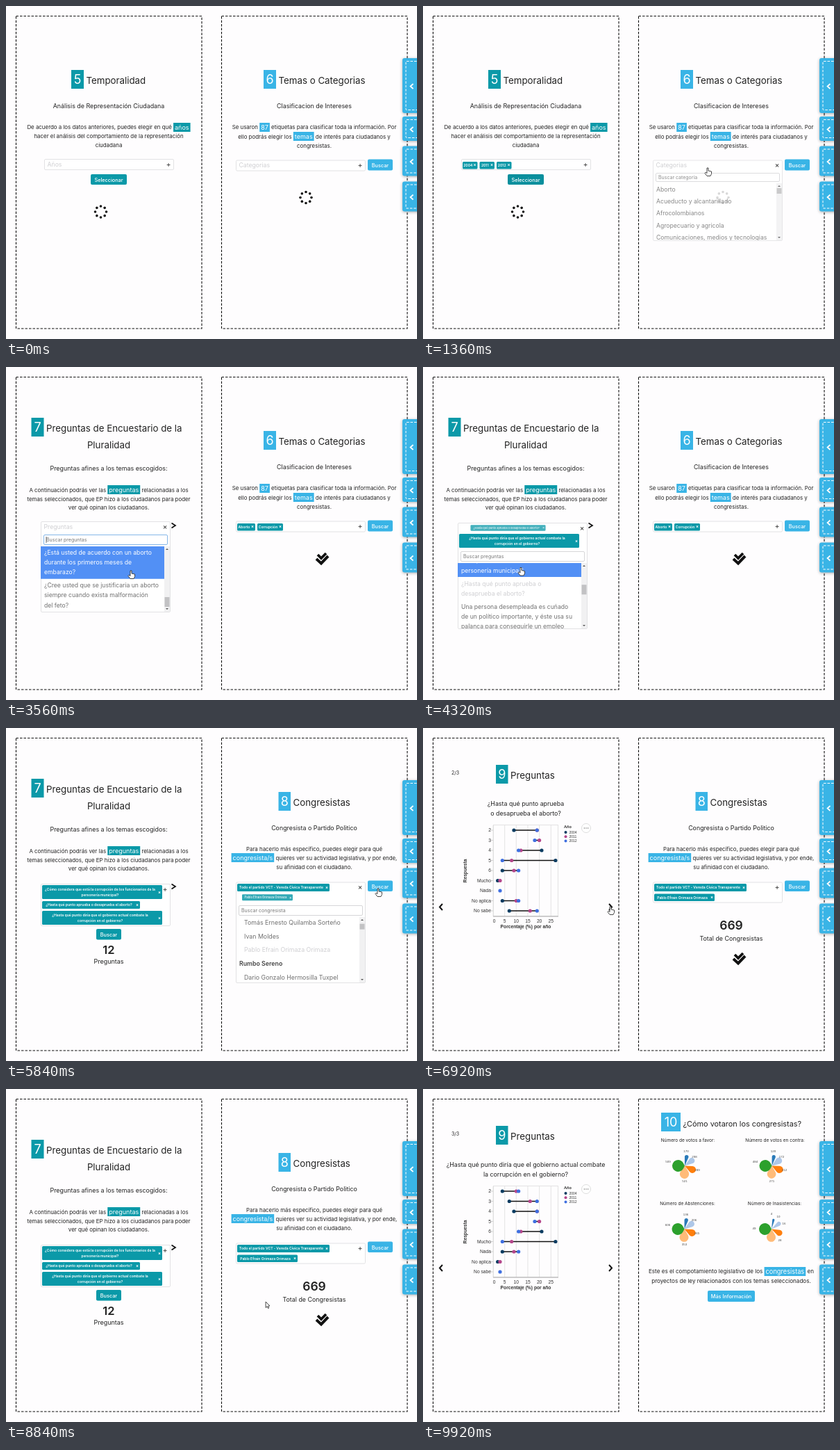
Write an HTML page with a canvas that moves like this. It is 592 px wide and 479 px high and loops after 9.96 s.

```html
<!DOCTYPE html>
<html lang="es">
<head>
<meta charset="utf-8">
<style>
html, body { margin: 0; width: 100%; height: 100%; overflow: hidden; background: #fefdfe; }
canvas { display: block; }
</style>
</head>
<body>
<canvas id="stage" width="592" height="479"></canvas>
<script>
const ctx = document.getElementById('stage').getContext('2d');
const LOOP = 9960, STEP = 40;
const PAPER = '#fefdfe', TEAL = '#0b99a8', BLUE = '#39b4e6';
const INK = '#222', GREY = '#707070', PALE = '#cfcfd2', PICK = '#5290f5';
const SANS = 'Inter, sans-serif', ARIAL = '"Liberation Sans", sans-serif';

const clamp = v => Math.max(0, Math.min(1, v));
const smooth = v => v * v * (3 - 2 * v);
const between = (t, a, b) => t >= a && t < b;

// Piecewise eased value through [time, value...] keys.
function track(t, keys) {
  if (t <= keys[0][0]) return keys[0].slice(1);
  for (let i = 1; i < keys.length; i++) {
    const [a, b] = [keys[i - 1], keys[i]];
    if (t <= b[0]) {
      const p = smooth((t - a[0]) / (b[0] - a[0]));
      return a.slice(1).map((v, k) => v + (b[k + 1] - v) * p);
    }
  }
  return keys[keys.length - 1].slice(1);
}

function text(s, x, y, size, { color = INK, align = 'left', weight = 400, family = SANS } = {}) {
  ctx.font = `${weight} ${size}px ${family}`;
  ctx.textAlign = align;
  ctx.fillStyle = color;
  ctx.fillText(s, x, y + size * 0.36);
}
const centered = (s, x, y, size, opts) => text(s, x, y, size, { align: 'center', ...opts });

function box(x, y, w, h, fill, stroke, r = 1.5) {
  ctx.beginPath();
  ctx.roundRect(x, y, w, h, r);
  if (fill) { ctx.fillStyle = fill; ctx.fill(); }
  if (stroke) { ctx.strokeStyle = stroke; ctx.lineWidth = 1; ctx.stroke(); }
}

function disc(x, y, r, color) {
  ctx.beginPath();
  ctx.arc(x, y, r, 0, 7);
  ctx.fillStyle = color;
  ctx.fill();
}

function line(points, color, width) {
  ctx.beginPath();
  points.forEach(([x, y]) => ctx.lineTo(x, y));
  ctx.strokeStyle = color;
  ctx.lineWidth = width;
  ctx.stroke();
}

// Centered line; parts wrapped in [ ] become highlighted words.
function rich(s, cx, y, color, size = 7.9) {
  const big = size * 1.14;
  const parts = s.split(/(\[.*?\])/).filter(Boolean).map(p => {
    const mark = p[0] === '[', str = mark ? p.slice(1, -1) : p;
    ctx.font = `400 ${mark ? big : size}px ${SANS}`;
    return { mark, str, w: ctx.measureText(str).width + (mark ? 4 : 0) };
  });
  let x = cx - parts.reduce((sum, p) => sum + p.w, 0) / 2;
  for (const p of parts) {
    if (p.mark) {
      box(x, Math.round(y - 7), p.w, 13, color, null, 0);
      text(p.str, x + 2, y, big, { color: '#fff' });
    } else text(p.str, x, y, size);
    x += p.w;
  }
}

function heading(n, x, y, w, color, title, size = 13.3) {
  box(x, y, w, 27, color, null, 0);
  centered(n, x + w / 2, y + 13.5, 18, { color: '#fff' });
  text(title, x + w + 3.5, y + 15.6, size);
}

function button(s, x, y, w, h, color) {
  box(x, y, w, h, color, null, 2);
  centered(s, x + w / 2, y + h / 2 + 0.7, 7.3, { color: '#fff', weight: 500 });
}

function chip(lines, x, y, w, h, grow = 1) {
  const s = 0.5 + grow / 2;
  ctx.save();
  ctx.globalAlpha = s;
  ctx.translate(x + w / 2, y + h / 2);
  ctx.scale(s, s);
  box(-w / 2, -h / 2, w, h, TEAL);
  lines.forEach((l, i) =>
    centered(l, -3, (i - (lines.length - 1) / 2) * 8.2, 5.05, { color: '#fff', weight: 600 }));
  centered('×', w / 2 - 4, lines.length > 1 ? 1 : 0, 6, { color: '#fff', weight: 700 });
  ctx.restore();
}

function spinner(x, y) {
  for (let i = 0; i < 8; i++) {
    const a = i * Math.PI / 4;
    disc(x + 8 * Math.cos(a), y + 8 * Math.sin(a), 1.8, '#111');
  }
}

function doubleCheck(x, y) {
  line([[x - 6, y - 5], [x - 1, y], [x + 6, y - 7]], '#111', 3.8);
  line([[x - 8, y + 1], [x - 1, y + 7.5], [x + 9, y - 3]], '#111', 4);
}

const rowHeight = (list, row) => row.lines.length * list.pitch + list.pad;
const listHeight = list => list.rows.reduce((h, r) => h + rowHeight(list, r), 0);

function drawList(list, x, y, w, h, scroll, hot, picked) {
  ctx.save();
  ctx.beginPath();
  ctx.rect(x, y, w, h);
  ctx.clip();
  let top = y - scroll;
  list.rows.forEach((row, i) => {
    const height = rowHeight(list, row);
    const active = i === hot && !picked.includes(i);
    if (active) box(x, top, w - 8, height, PICK, null, 0);
    const color = active ? '#fff' : picked.includes(i) ? PALE : row.group ? '#444' : GREY;
    row.lines.forEach((l, k) => text(l, x + 5 + (row.indent || 0),
      top + list.pad / 2 + (k + 0.5) * list.pitch, list.size, { color, weight: row.group ? 600 : 400 }));
    top += height;
  });
  box(x + w - 8, y, 8, h, '#f1f1f2', null, 0);
  const p = clamp(scroll / Math.max(1, listHeight(list) - h));
  box(x + w - 7.5, y + 7 + p * (h - 28), 7, list.thumb, '#c2c2c4', null, 0);
  for (const [cy, d] of [[y + 4, -1], [y + h - 4, 1]]) {
    ctx.beginPath();
    ctx.moveTo(x + w - 6, cy - d);
    ctx.lineTo(x + w - 2, cy - d);
    ctx.lineTo(x + w - 4, cy + d);
    ctx.fillStyle = '#555';
    ctx.fill();
  }
  ctx.restore();
}

function picker({ x, y, w = 186, h = 15, open, hint, search, end, list, gap = 19, view = 94, scroll = 0, hot, picked = [], focus, fade = 1 }) {
  if (!open) {
    box(x + 0.5, y + 0.5, w, h, '#fff', '#e2e2e4');
  } else {
    ctx.globalAlpha = fade;
    box(x + 0.5, y + 0.5, w, end + gap + view - y, '#fff', '#e2e2e4');
    box(x + 4.5, end + 2.5, w - 8, gap === 17 ? 12 : 14, '#fff', focus ? '#86b7e8' : '#d6d6d8');
    text(search, x + 8, end + (gap === 17 ? 8.5 : 9.5), 7, { color: '#777' });
    if (focus) line([[x + 8, end + 5], [x + 8, end + 14]], '#333', 0.7);
    drawList(list, x, end + gap, w, view, scroll, hot, picked);
    ctx.globalAlpha = 1;
  }
  if (hint) text(hint, x + 4.5, y + 7.5, 8.7, { color: PALE });
  centered(open ? '×' : '+', x + w - 7, y + 7, 10, { color: '#444', weight: 500 });
}

const single = (s, extra) => ({ lines: [s], ...extra });
const years = {
  rows: [2004, 2005, 2006, 2008, 2009, 2010, 2011, 2012, 2013].map(n => single(String(n))),
  pitch: 17.3, pad: 0, size: 8.65, thumb: 14
};
const topics = {
  rows: ['Aborto', 'Acueducto y alcantarillado', 'Afrocolombianos', 'Agropecuario y agricola',
    'Comunicaciones, medios y tecnologias', 'Conflicto armado', 'Corrupción', 'Cultura', 'Defensa',
    'Deporte', 'Educación', 'Empleo', 'Energía', 'Salud', 'Turismo', 'Vivienda'].map(s => single(s)),
  pitch: 17.3, pad: 0, size: 8.65, thumb: 8
};
const GOV = ['¿Hasta qué punto diría que el gobierno actual combate la', 'corrupción en el gobierno?'];
const OFFICE = ['¿Cómo considera que está la corrupción de los funcionarios de la', 'personería municipal?'];
const ABORTION = ['¿Hasta qué punto aprueba o desaprueba el aborto?'];
const questions = {
  rows: [
    '¿Qué tanto confía usted/en los partidos políticos?',
    '¿Cree que el voto cambia/la forma como se gobierna/en el país?',
    '¿Está satisfecho con la/democracia actual?',
    '¿Cómo considera que está la/corrupción de los funcionarios de la/personería municipal?',
    '¿Hasta qué punto aprueba o/desaprueba el aborto?',
    'Una persona desempleada es cuñado/de un político importante, y éste usa su/palanca para conseguirle un empleo/público. ¿Qué opina usted?',
    '¿Hasta qué punto diría que el/gobierno actual combate la/corrupción en el gobierno?',
    '¿Qué tan común es la/corrupción en el país?',
    '¿Ha tenido que pagar un/soborno durante el/último año?',
    '¿Está usted de acuerdo con un aborto/durante los primeros meses de/embarazo?',
    '¿Cree usted que se justificaria un aborto/siempre cuando exista malformación/del feto?'
  ].map(s => ({ lines: s.split('/') })),
  pitch: 14.1, pad: 5, size: 8.65, thumb: 14
};
const PARTY = 'Todo el partido VCT - Vereda Cívica Transparente';
const MEMBER = 'Pablo Efrain Orimaza Orimaza';
const members = {
  rows: [single(PARTY, { group: true }),
    ...['Tomás Ernesto Quilamba Sorteño', 'Ivan Moldes', MEMBER].map(s => single(s, { indent: 7 })),
    single('Rumbo Sereno', { group: true }),
    ...['Dario Gonzalo Hermosilla Tuxpel', 'Elena Marquina Sotelor', 'Nestor Pardales'].map(s => single(s, { indent: 7 })),
    ...Array.from({ length: 24 }, (_, i) => single('Congresista ' + (i + 1), { indent: 7 }))],
  pitch: 19.6, pad: 0, size: 8.8, thumb: 8
};

function panelYears(t) {
  heading('5', 94, 92, 18, TEAL, 'Temporalidad');
  centered('Análisis de Representación Ciudadana', 148, 143.5, 8.9);
  rich('De acuerdo a los datos anteriores, puedes elegir en qué [años]', 148, 174.5, TEAL);
  rich('hacer el análisis del comportamiento de la representación', 148, 187.5, TEAL);
  rich('ciudadana', 148, 200.5, TEAL);
  button('Seleccionar', 122, 242, 52, 15, between(t, 1000, 1400) ? '#0a8f9d' : TEAL);
  spinner(136.5, 296);
  const picks = [[400, 0], [620, 6], [780, 7]].filter(p => t >= p[0]);
  picker({
    x: 55, y: 220, open: between(t, 160, 900), hint: picks.length ? '' : 'Años',
    search: 'Buscar año', end: 236, gap: 17, view: 82, list: years,
    scroll: track(t, [[430, 0], [560, 73]])[0], hot: t < 500 ? 0 : t < 640 ? 6 : 7,
    picked: picks.map(p => p[1])
  });
  picks.forEach(([, i], k) => chip(years.rows[i].lines, 57 + k * 24.5, 224, 21.5, 10.5));
}

function panelTopics(t) {
  heading('6', 371, 92, 18, BLUE, 'Temas o Categorias');
  centered('Clasificacion de Intereses', 444, 143.5, 8.9);
  rich('Se usaron [87] etiquetas para clasificar toda la información. Por', 444, 174.5, BLUE);
  rich('ello podrás elegir los [temas] de interés para ciudadanos y', 444, 188, BLUE);
  rich('congresistas.', 444, 201.5, BLUE);
  button('Buscar', 521, 220.5, 36, 16, BLUE);
  if (t < 2200) spinner(432, 275.5); else doubleCheck(455, 275);
  const picks = [[1560, 0], [1880, 6]].filter(p => t >= p[0]);
  picker({
    x: 331, y: 221.5, open: between(t, 1300, 2000), fade: clamp((t - 1300) / 72),
    hint: picks.length ? '' : 'Categorias', search: 'Buscar categoría', end: 238, gap: 17, view: 82,
    list: topics, scroll: track(t, [[1600, 0], [1800, 70]])[0],
    hot: between(t, 1480, 1600) ? 0 : t > 1780 ? 6 : -1, picked: picks.map(p => p[1])
  });
  if (picks.length) chip(['Aborto'], 333, 225, 26, 10.5);
  if (picks.length > 1) chip(['Corrupción'], 362, 225, 37, 10.5);
}

function panelQuestions(t) {
  heading('7', 36.5, 73, 18, TEAL, 'Preguntas de Encuestario de la');
  centered('Pluralidad', 148, 112, 13.3);
  centered('Preguntas afines a los temas escogidos:', 148, 146, 8.9);
  rich('A continuación podrás ver las [preguntas] relacionadas a los', 148, 177, TEAL);
  rich('temas seleccionados, que EP hizo a los ciudadanos para poder', 148, 190, TEAL);
  rich('ver qué opinan los ciudadanos.', 148, 202.5, TEAL);
  line([[238.5, 224.5], [244, 228], [238.5, 231.5]], '#111', 1.7);

  const chosen = [[4400, OFFICE, 3, 173], [4240, ABORTION, 4, 141], [4060, GOV, 6, 173]].filter(c => t >= c[0]);
  const heights = chosen.map(c => c[1].length > 1 ? 20 : 11);
  const end = chosen.length ? 226 + heights.reduce((s, h) => s + h + 3, 0) : 239;
  picker({
    x: 50, y: chosen.length ? 224 : 222, h: chosen.length ? end - 226 : 15,
    open: between(t, 2900, 4480), focus: !chosen.length,
    hint: chosen.length ? '' : 'Preguntas', search: 'Buscar preguntas', end, list: questions,
    scroll: track(t, [[3080, 0], [3440, 384], [3640, 384], [3920, 224], [4080, 224], [4260, 141]])[0],
    hot: t < 3300 ? 1 : t < 3760 ? 9 : t < 4100 ? 6 : t < 4280 ? 4 : 3,
    picked: chosen.map(c => c[2])
  });
  let y = 226;
  chosen.forEach(([at, lines, , w], i) => {
    chip(lines, 52, y, w, heights[i], clamp((t - at) / 150));
    y += heights[i] + 3;
  });
  if (t >= 4480) button('Buscar', 130, 289, 36, 15.5, TEAL);
  if (t >= 4600) {
    centered(String(Math.round(12 * clamp((t - 4600) / 160))), 148, 319, 16.5, { weight: 600 });
    centered('Preguntas', 148, 336, 9);
  }
}

function panelMembers(t) {
  heading('8', 392.5, 92, 17.5, BLUE, 'Congresistas');
  centered('Congresista o Partido Politico', 444, 143.5, 8.9);
  rich('Para hacerlo más específico, puedes elegir para qué', 444, 174, BLUE);
  rich('[congresista/s] quieres ver su actividad legislativa, y por ende,', 444, 187, BLUE);
  rich('su afinidad con el ciudadano.', 444, 200.5, BLUE);
  button('Buscar', 521, 219.5, 36, 15.5, BLUE);
  const party = t >= 5360, member = t >= 5740;
  picker({
    x: 331, y: 221.5, h: member ? 29 : 15, open: between(t, 5040, 5900),
    hint: party ? '' : 'Congresistas', search: 'Buscar congresista',
    end: member ? 253 : party ? 239 : 237, list: members,
    scroll: track(t, [[5420, 0], [5620, 21.4]])[0],
    hot: between(t, 5180, 5420) ? 0 : between(t, 5620, 5760) ? 3 : -1,
    picked: [...(party ? [0] : []), ...(member ? [3] : [])]
  });
  if (party) chip([PARTY], 333, 224, 133, 11);
  if (member) chip([MEMBER], 333, 238.5, 87, 10.5, clamp((t - 5740) / 148));
  if (t >= 6040) {
    centered(String(Math.round(669 * smooth(clamp((t - 6040) / 360)))), 444, 284, 17.5, { weight: 600 });
    centered('Total de Congresistas', 444, 303, 8.9);
    doubleCheck(455, 331);
  }
}

const YEAR_COLORS = ['#0b3c61', '#b5478c', '#3f6fe0'];
// Each answer: values for 2004, 2011 and 2012.
const ANSWERS = [
  ['2', 4, 10, 11], ['3', 7, 16, 19], ['4', 9, 19, 19], ['5', null, 20, 18], ['6', 21, 12, 11],
  ['Mucho', 27, 8, 4], ['Nada', 4, 9, 11], ['No aplica', 2, 3, null], ['No sabe', null, null, 3]
];

function panelAnswers(t) {
  const page = t < 6600 ? 3 : t < 6840 ? 1 : t < 7080 ? 2 : 3;
  const arial = (s, x, y, size, opts) => text(s, x, y, size, { family: ARIAL, color: '#333', ...opts });
  heading('9', 105, 53, 17.5, TEAL, 'Preguntas');
  text(page + '/3', 41, 64, 7);
  const title = [
    ['¿Cómo considera que está la corrupción de los', 'funcionarios de la personería municipal?'],
    ['¿Hasta qué punto aprueba', 'o desaprueba el aborto?'],
    ['¿Hasta qué punto diría que el gobierno actual combate', 'la corrupción en el gobierno?']
  ][page - 1];
  title.forEach((l, i) => centered(l, 148, 109 + i * 14.3, 8.85));

  const px = v => 101 + v * 3.33;
  for (let v = 0; v <= 25; v += 5) {
    line([[px(v), 140], [px(v), 271]], '#ddd', 0.8);
    arial(String(v), px(v) + (v ? 0 : 1.5), 278, 6.7, { align: 'center' });
  }
  ctx.strokeStyle = '#ddd';
  ctx.strokeRect(101.5, 139.5, 93, 131);
  line([[101, 271], [195, 271]], '#999', 0.8);
  ANSWERS.forEach(([label], i) => {
    const y = 147 + i * 14.5;
    const values = ANSWERS[(i + (3 - page) * 2) % ANSWERS.length].slice(1);
    const shown = values.filter(v => v !== null);
    arial(label, 98, y, 6.7, { align: 'right' });
    line([[97, y], [101, y]], '#aaa', 0.5);
    line([[px(Math.min(...shown)), y], [px(Math.max(...shown)), y]], '#111', 1.5);
    values.forEach((v, k) => v !== null && disc(px(v), y, 2.6, YEAR_COLORS[k]));
  });
  arial('Porcentaje (%) por año', 148, 286, 6.7, { align: 'center', weight: 700 });
  ctx.save();
  ctx.translate(60.5, 205.5);
  ctx.rotate(-Math.PI / 2);
  arial('Respuesta', 0, 0, 6.7, { align: 'center', weight: 700 });
  ctx.restore();
  arial('Año', 203, 142, 5.6, { weight: 700 });
  ['2004', '2011', '2012'].forEach((s, i) => {
    disc(205.5, 150 + i * 6.2, 2, YEAR_COLORS[i]);
    arial(s, 210.5, 150 + i * 6.2, 5);
  });
  box(228.5, 137.5, 13, 13, '#fff', '#ddd', 6.5);
  [-2.6, 0, 2.6].forEach(d => disc(235 + d, 144, 0.75, '#777'));
  line([[28, 253], [24, 257.5], [28, 262]], '#111', 2);
  line([[268, 253], [272, 257.5], [268, 262]], '#111', 2);
}

const PETAL_COLORS = ['#2a7ab9', '#aec7e8', '#ff7f0e', '#ffbb78', '#2ca02c'];
function votes(title, cx, cy, labels, sizes, spots) {
  centered(title, cx + 4.5, cy - 36.5, 6.5);
  const angles = [-78, -36, 26, 92, 180];
  sizes.forEach((r, i) => {
    const a = angles[i] * Math.PI / 180, d = i === 4 ? r + 1 : 14 - r / 3;
    const spread = Math.acos(Math.min(0.95, r / d));
    ctx.beginPath();
    ctx.moveTo(cx, cy);
    ctx.arc(cx + d * Math.cos(a), cy + d * Math.sin(a), r, a + Math.PI + spread, a + Math.PI - spread);
    ctx.fillStyle = PETAL_COLORS[i];
    ctx.fill();
  });
  labels.forEach((n, i) => centered(String(n), cx + spots[i][0], cy + spots[i][1], 4.4, { color: '#444', family: ARIAL }));
}

function panelVotes() {
  heading('10', 343, 34, 28, BLUE, '¿Cómo votaron los congresistas?', 10.9);
  const spots = [[2, -21], [14, -13], [18, 6], [0, 22], [-24, -6]];
  votes('Número de votos a favor:', 377, 110.5, [170, 298, 289, 521, 509], [2.8, 4.2, 5, 6.6, 8.5], spots);
  votes('Número de votos en contra:', 502.5, 110.5, [120, 172, 212, 271, 484], [2.6, 4.6, 5.2, 6.3, 8.5], spots);
  votes('Número de Abstenciones:', 376.5, 201.5, [136, 206, 265, 353, 606], [2.7, 4.3, 5, 6.5, 8.5], spots);
  votes('Número de Inasistencias:', 502, 201.5, [4, 10, 16, 28, 49], [1.6, 3, 4.3, 6.5, 8.5],
    [[0, -22], [10, -18], [18, -8], [12, 16], [-25, -1]]);
  rich('Este es el compotamiento legislativo de los [congresistas] en', 444, 262.5, BLUE, 8.1);
  rich('proyectos de ley relacionados con los temas seleccionados.', 444, 276, BLUE, 8.1);
  button('Más Información', 410, 290, 68, 16, BLUE);
}

function panel(draw, t, left, offset = 0) {
  const x = left ? 0 : 296;
  ctx.save();
  ctx.translate(0, Math.round(offset));
  ctx.fillStyle = PAPER;
  ctx.fillRect(x, 0, 296, 480);
  ctx.setLineDash([3.5, 2]);
  ctx.strokeStyle = '#111';
  ctx.lineWidth = 1.1;
  ctx.strokeRect(x + 14.5, 14.5, 267.5, 449.5);
  ctx.setLineDash([]);
  draw(t);
  ctx.restore();
}

const slideIn = (t, start) => 480 * (1 - clamp((t - start) / 200) ** 2);
const slideOut = (t, start) => 480 * clamp((t - start) / 200) ** 2;

function tabs() {
  for (const [y, h] of [[75, 79], [159, 35], [201.5, 43], [252.5, 43]]) {
    ctx.save();
    ctx.shadowColor = 'rgba(0,0,0,.32)';
    ctx.shadowBlur = 4;
    ctx.shadowOffsetY = 1;
    box(571, y, 30, h, BLUE, null, 3);
    ctx.restore();
    ctx.setLineDash([3.5, 2]);
    box(576, y + 4.5, 30, h - 9, null, '#fff', 1);
    ctx.setLineDash([]);
    const cy = y + h / 2 + 1;
    line([[586.5, cy - 3.5], [582.5, cy], [586.5, cy + 3.5]], '#fff', 1.7);
  }
}

const MOUSE = [
  [40, 250, 300], [160, 234, 228], [360, 75, 262], [430, 75, 262], [600, 78, 293], [660, 78, 293],
  [760, 80, 309], [900, 160, 248], [1060, 148, 248], [1260, 508, 228], [1360, 410, 233],
  [1520, 362, 262], [1600, 362, 262], [1800, 375, 288], [1900, 375, 288], [2000, 508, 228],
  [2120, 538, 230], [2240, 538, 230], [2860, 229, 228], [3060, 165, 288], [3560, 180, 293],
  [3900, 150, 296], [4080, 150, 296], [4320, 141, 288.5], [4420, 141, 288.5], [4540, 148, 298],
  [4640, 148, 298], [5020, 509, 228], [5220, 400, 266], [5400, 400, 266], [5660, 410, 306],
  [5760, 410, 306], [5840, 536, 231], [6040, 536, 231], [6540, 270, 257], [7160, 270, 257],
  [7500, 400, 190], [7920, 446.5, 213], [8500, 470, 300], [9100, 310, 310], [9700, 300, 320]
];

function cursor(t) {
  if (!between(t, 40, 9700)) return;
  const [x, y] = track(t, MOUSE);
  const arrow = between(t, 2300, 2820) || between(t, 4660, 5000) || between(t, 6100, 6500) || t > 7200;
  ctx.save();
  ctx.translate(x, y);
  ctx.beginPath();
  const shape = arrow
    ? [[0, 0], [0, 8.5], [2, 6.8], [3.4, 9.6], [4.7, 9], [3.4, 6.3], [5.8, 6]]
    : [[-1, 0], [1, 0], [1, 4], [5.5, 5], [5.5, 8.5], [4, 11.5], [-1, 11.5], [-4, 7.5], [-3, 6.2], [-1, 7.5]];
  shape.forEach(p => ctx.lineTo(...p));
  ctx.closePath();
  ctx.lineJoin = 'round';
  ctx.fillStyle = '#fff';
  ctx.strokeStyle = '#333';
  ctx.lineWidth = 0.9;
  ctx.fill();
  ctx.stroke();
  ctx.restore();
}

function draw(t) {
  ctx.fillStyle = PAPER;
  ctx.fillRect(0, 0, 592, 479);
  if (t < 2600) panel(panelYears, t, true);
  if (t >= 2400) panel(panelQuestions, t, true, slideIn(t, 2400));
  if (between(t, 6600, 7945)) panel(panelAnswers, t, true, slideOut(t, 7745));
  if (t >= 9250) panel(panelAnswers, t, true, slideIn(t, 9250));

  if (t < 4900) panel(panelTopics, t, false);
  if (t >= 4700) panel(panelMembers, t, false, slideIn(t, 4700));
  if (between(t, 6920, 7700)) panel(panelVotes, t, false, t < 7500 ? slideIn(t, 6920) : slideOut(t, 7500));
  if (t >= 9500) panel(panelVotes, t, false, slideIn(t, 9500));
  tabs();
  cursor(t);
}

function frame() {
  const t = performance.now() % LOOP;
  draw(Math.floor(t / STEP) * STEP);
  requestAnimationFrame(frame);
}
frame();
</script>
</body>
</html>
```
